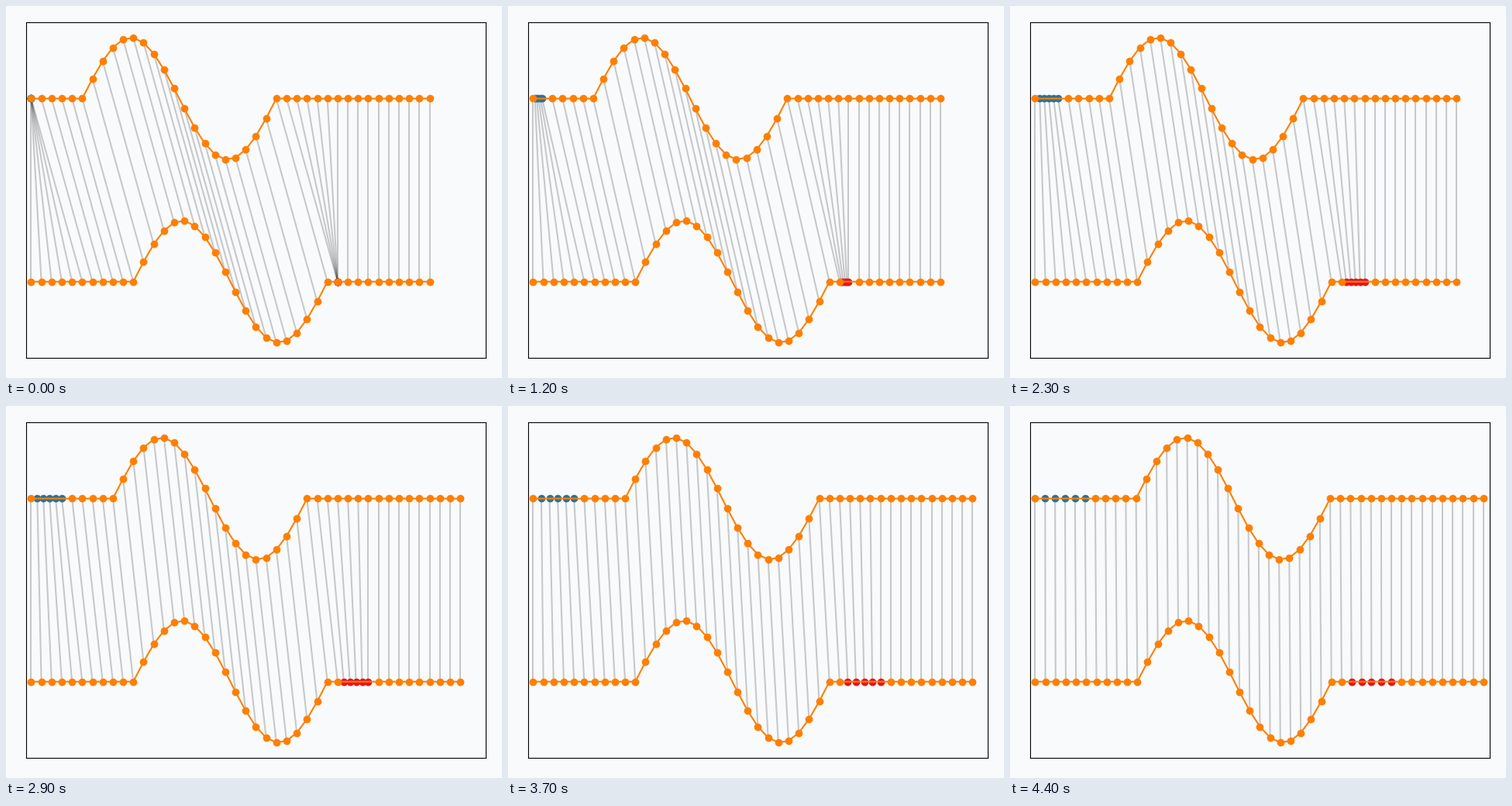
Recreate the animation shown at these times as a matplotlib script. Size 640x480 px, loop 5 s.

```python
import numpy as np
import matplotlib.pyplot as plt
from matplotlib.animation import FuncAnimation

W, H, DPI = 640, 480, 100
BG, ORANGE, BLUE, RED = "#f9fafc", "#ff7f00", "#2c7299", "#e8141c"
N, EXTRA = 45, 5          # points per series, inserted points
TOP_AT, LOW_AT = 1, 31    # first inserted index in each series
FRAMES, HOLD, STEPS = 50, 5, 40
PAD = 1.08 * 14 * DPI / 72        # outer margin in pixels
EDGE = PAD + 3.5 * DPI / 72       # left and bottom leave room for ticks

fig = plt.figure(figsize=(W / DPI, H / DPI), dpi=DPI, facecolor=BG)
ax = fig.add_axes([EDGE / W, EDGE / H, 1 - (EDGE + PAD) / W,
                   1 - (EDGE + PAD) / H], facecolor=BG)
ax.set(xlim=(-0.5, N - 0.5), ylim=(-1.25, 4.25), xticks=[], yticks=[])

wave = np.zeros(N)
wave[10:30] = np.sin(np.linspace(0, 2 * np.pi, 20))
idx = np.arange(N)


def stretched(first, s):
    """Positions when the inserted run is opened to a fraction s."""
    return idx - (1 - s) * np.clip(idx - first + 1, 0, EXTRA)


class Series:
    def __init__(self, first, base, color):
        self.first, self.y = first, wave + base
        self.new = (idx >= first) & (idx < first + EXTRA)
        self.dots, = ax.plot([], [], "o", color=color, zorder=2.1)
        self.line, = ax.plot([], [], "o-", color=ORANGE, zorder=2.2)

    def update(self, s):
        x = stretched(self.first, s)
        self.dots.set_data(x[self.new], self.y[self.new])
        self.line.set_data(x[~self.new], self.y[~self.new])
        return x


top = Series(TOP_AT, 3, BLUE)
low = Series(LOW_AT, 0, RED)
links = [ax.plot([], [], color="k", alpha=0.2, zorder=2)[0] for _ in idx]


def update(frame):
    s = np.clip(frame - HOLD, 0, STEPS - 1) / STEPS
    xt, xl = top.update(s), low.update(s)
    for i, link in enumerate(links):
        link.set_data([xt[i], xl[i]], [top.y[i], low.y[i]])
    return links + [top.dots, low.dots, top.line, low.line]


anim = FuncAnimation(fig, update, frames=FRAMES, interval=100, repeat=True,
                     repeat_delay=0, blit=False)
plt.show()
```
